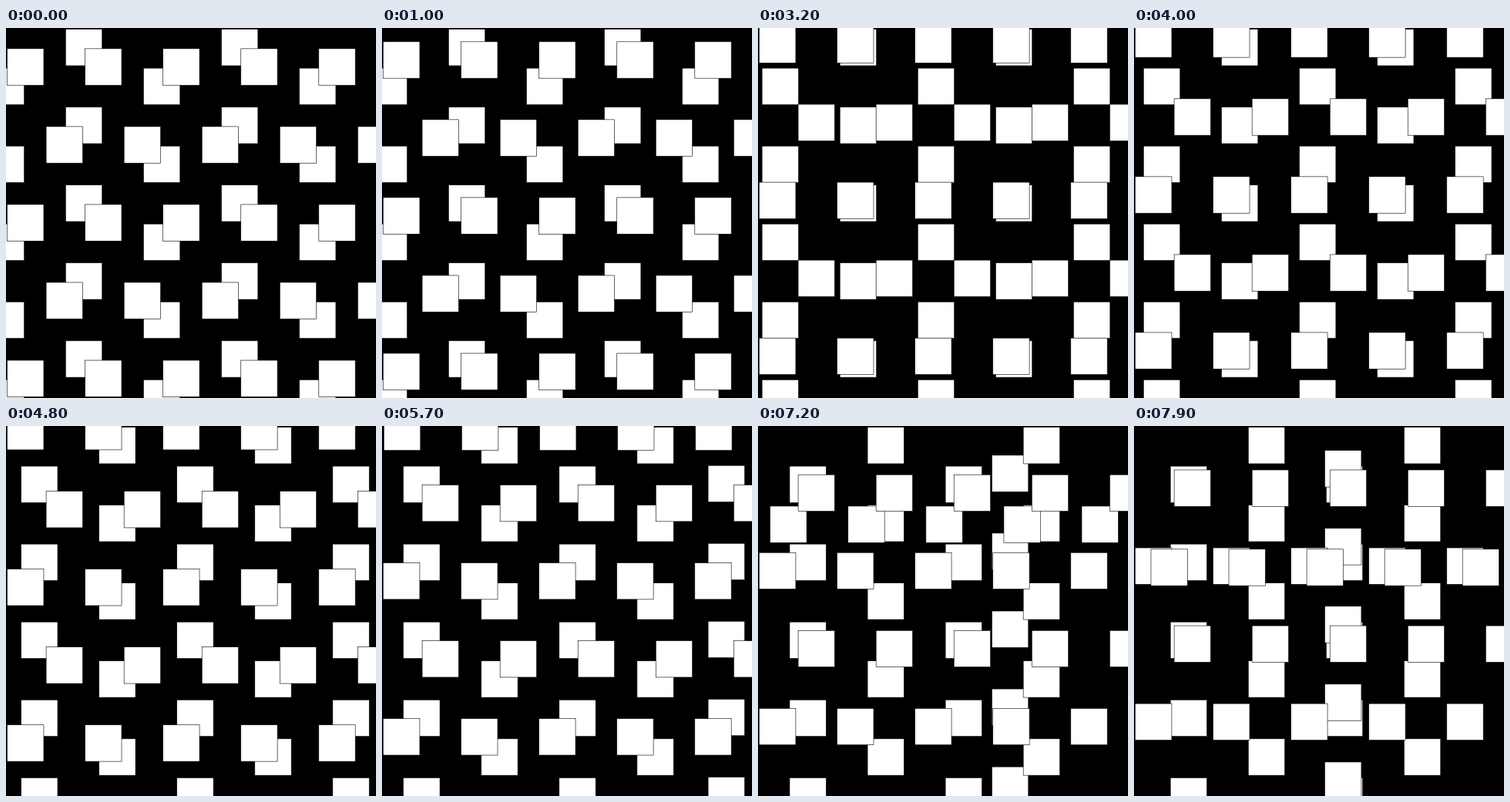
An HTML page for the animation above (8 s loop, 480x480 px).

```html
<!DOCTYPE html>
<html lang="en">
<head>
<meta charset="utf-8">
<title>Sliding squares</title>
<style>
  html, body { margin: 0; width: 100%; height: 100%; overflow: hidden; background: #000; }
  svg { display: block; width: 100vw; height: 100vh; }
  rect { fill: #fff; stroke: #000; stroke-width: 0.6; }
</style>
</head>
<body>
<svg id="stage" viewBox="0 0 480 480"></svg>
<script>
const CELL = 480 / 9.5;
const SIZE = CELL * 15 / 16;
const STEP_MS = 100;
const STEPS = 80;
const SLIDE_STEPS = 56;   // every line drifts one cell
const RETURN_STEPS = 57;  // the line at the edge crosses the stage

const stage = document.getElementById("stage");

function addRect() {
  const rect = document.createElementNS("http://www.w3.org/2000/svg", "rect");
  rect.setAttribute("width", SIZE);
  rect.setAttribute("height", SIZE);
  return stage.appendChild(rect);
}

// Line order is paint order: the returning line 0 lies between the two parities.
function makeSet(mirrored) {
  return [2, 4, 0, 1, 3].flatMap(line =>
    [0, 2, 4, 6, 8].map(k => ({ line, mirrored, column: k + line % 2, rect: addRect() })));
}

const squares = [...makeSet(true), ...makeSet(false)];

function place(square, drift, back) {
  let x = square.column + 0.5;
  let y = 1 + 2 * square.line - drift;
  if (square.line === 0 && back > 0) {
    x += back;
    y = 9 * back;
  }
  // The rightward set is the upward set reflected across the rising diagonal.
  if (square.mirrored) [x, y] = [9 - y, 10 - x];
  square.rect.setAttribute("x", (x * CELL - SIZE / 2).toFixed(2));
  square.rect.setAttribute("y", (y * CELL - SIZE / 2).toFixed(2));
}

function draw(ms) {
  const step = Math.floor(ms / STEP_MS) % STEPS;
  const back = Math.max(0, step - SLIDE_STEPS) / RETURN_STEPS;
  const drift = Math.min(1, step / SLIDE_STEPS) + back;
  for (const square of squares) place(square, drift, back);
}

const start = performance.now();
function tick() {
  draw(performance.now() - start);
  requestAnimationFrame(tick);
}
tick();
</script>
</body>
</html>
```
